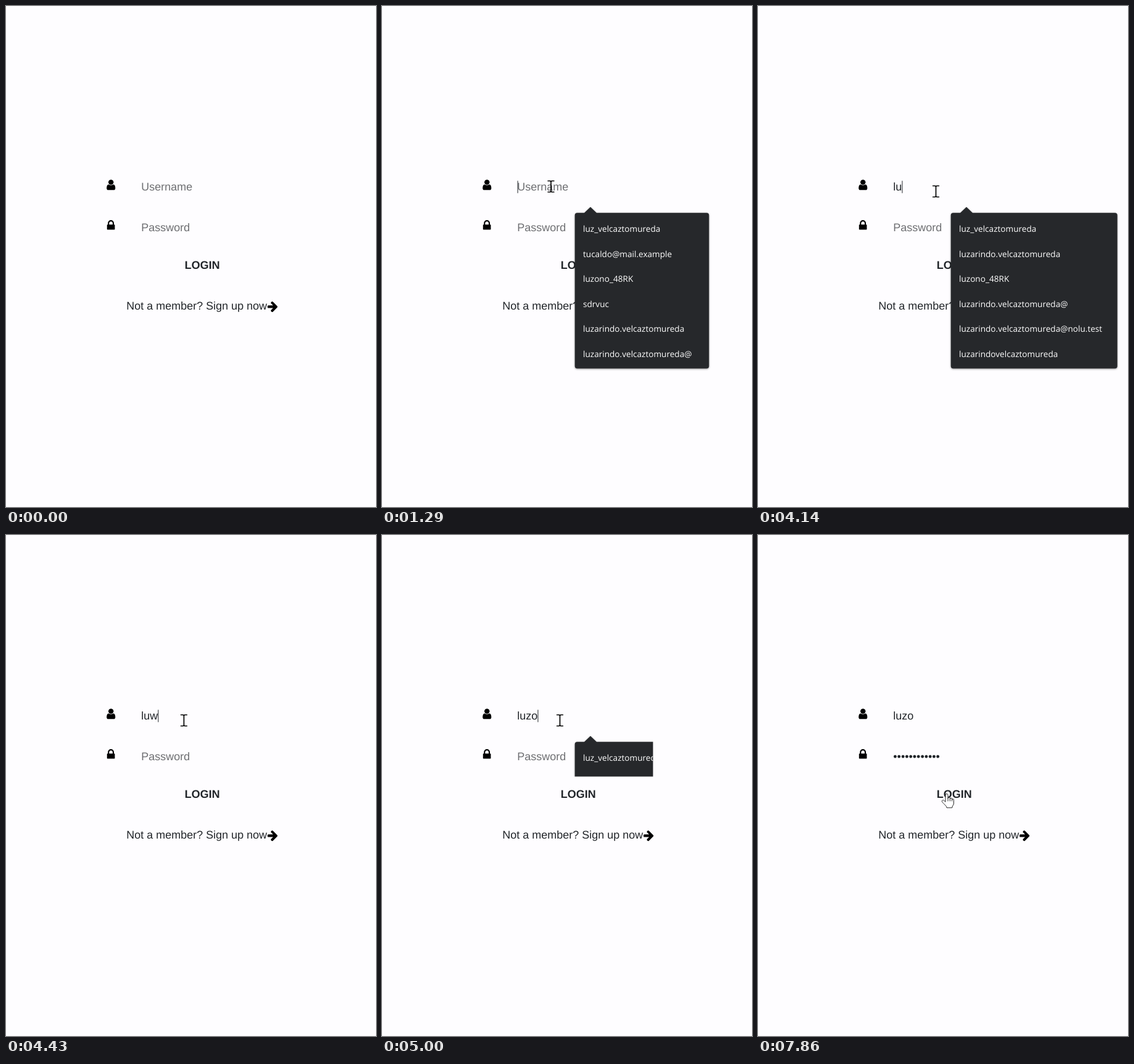
Write an HTML page that moves like this. It is 600 px wide and 812 px high and loops after 8 s.

```html
<!DOCTYPE html>
<html lang="en">
<head>
<meta charset="utf-8">
<title>Login form</title>
<style>
  html, body { margin: 0; width: 100%; height: 100%; overflow: hidden; background: #fefdff; }
  svg { display: block; width: 600px; height: 812px; }
  text { font: 18px "Liberation Sans", Arial, sans-serif; fill: #212529; text-rendering: geometricPrecision; }
  .hint { fill: #6e6f72; }
  .login { font-weight: bold; }
  #menu text { font: 13.6px "Open Sans", "Noto Sans", sans-serif; fill: #fff; }
  #panel { fill: #26282b; filter: drop-shadow(0 1.5px 1.5px rgba(0, 0, 0, .4)); }
</style>
</head>
<body>
<svg viewBox="0 0 600 812">
  <defs>
    <clipPath id="cut"><rect x="300" y="320" width="139.5" height="71.5"/></clipPath>
  </defs>

  <g transform="translate(163.2 296.9) scale(.011 -.011)">
    <path d="M1280 137q0-109-62.5-187t-150.5-78h-854q-88 0-150.5 78t-62.5 187q0 85 8.5 160.5t31.5 152t58.5 131t94 89t134.5 34.5q131-128 313-128t313 128q76 0 134.5-34.5t94-89t58.5-131t31.5-152t8.5-160.5z"/>
    <circle cx="640" cy="1024" r="384"/>
  </g>
  <path transform="translate(163.8 362.6) scale(.011 -.011)" d="M320 768h512v192q0 106-75 181t-181 75t-181-75t-75-181v-192zM1152 672v-576q0-40-28-68t-68-28h-960q-40 0-68 28t-28 68v576q0 40 28 68t68 28h32v192q0 184 132 316t316 132t316-132t132-316v-192h32q40 0 68-28t28-68z"/>
  <path transform="translate(424.1 493.8) scale(.011 -.011)" d="M1472 576q0-54-37-91l-651-651q-39-37-91-37q-51 0-90 37l-75 75q-38 38-38 91t38 91l293 293h-704q-52 0-84.5 37.5t-32.5 90.5v128q0 53 32.5 90.5t84.5 37.5h704l-293 294q-38 36-38 90t38 90l75 75q38 38 90 38q53 0 91-38l651-651q37-35 37-90z"/>

  <text id="user" x="219.3" y="299.2"></text>
  <text id="pass" x="219.3" y="364.6"></text>
  <text class="login" x="289.8" y="426.2">LOGIN</text>
  <text x="195.2" y="492.2">Not a member? Sign up now</text>
  <rect id="caret" width="1" height="20" fill="#212529"/>

  <g id="menu">
    <path id="panel"/>
    <g id="items"></g>
  </g>

  <path id="beam" d="M-5.5-9h4.3l1.2 1l1.2-1h4.3M0-8.5V8.5M-5.5 9h4.3l1.2-1l1.2 1h4.3" fill="none" stroke="#000" stroke-width="1.7"/>
  <g id="hand" fill="#fff" stroke="#222" stroke-width="1" stroke-linejoin="round">
    <path d="M-2 13V2a2 2 0 0 1 4 0V7.5a1.7 1.7 0 0 1 3.4 0V8.5a1.6 1.6 0 0 1 3.2 0V9.7a1.4 1.4 0 0 1 2.8 0V15.5C11.4 18.5 8.8 19 8.8 22.5H0C0 19.5-6.5 15-7.5 12.8S-6 9.6-4.5 10.6z"/>
    <path d="M2 7V12M5.4 8V12M8.6 9V12" fill="none"/>
  </g>
</svg>
<script>
const LOOP = 8000, TICKS = 56;
const $ = id => document.getElementById(id);
const show = (el, on) => el.setAttribute('visibility', on ? 'visible' : 'hidden');
const put = (el, x, y) => el.setAttribute('transform', `translate(${x} ${y})`);

const first = 'luzarindo', last = 'velcaztomureda';
const full = `${first}.${last}`, short = 'luz_' + last, nick = 'luzono_48RK';
const lists = {
  recent: { right: 530.3, names: [short, 'tucaldo@mail.example', nick, 'sdrvuc', full, full + '@'] },
  match: { right: 582.7, names: [short, full, nick, full + '@', full + '@nolu.test', first + last] },
  single: { right: 435, names: [nick] }
};

// Each track holds [tick, value] pairs; a value stays until the next one.
const typed = [[0, ''], [28, 'l'], [29, 'lu'], [31, 'luw'], [33, 'lu'], [34, 'luz'], [35, 'luzo']];
const menus = [[0, ''], [9, 'recent'], [28, 'match'], [31, ''], [33, 'match'], [36, 'single'], [43, '']];
const blink = [[0, 0], [9, 1], [13, 0], [16, 1], [20, 0], [24, 1], [39, 0], [43, 1], [53, 0]];
const at = (track, n) => track.filter(k => k[0] <= n).pop()[1];

// Pointer glides: first tick, last tick, end point.
const glides = [[4, 7, 274, 292.5], [17, 21, 288.5, 300.5], [38, 42, 253.5, 371.5], [52, 55, 306, 419.5]];

function pointer(n) {
  let x = 262, y = 352;
  for (const [a, b, tx, ty] of glides) {
    const p = Math.min(1, Math.max(0, (n - a) / (b - a)));
    const e = p * p * (3 - 2 * p);
    x += (tx - x) * e;
    y += (ty - y) * e;
  }
  return [x, y];
}

function field(el, value, hint) {
  el.textContent = value || hint;
  el.setAttribute('class', value ? '' : 'hint');
  return value ? 219.4 + el.getComputedTextLength() : 219.6;
}

function drawMenu(key, cut) {
  const menu = $('menu'), list = lists[key];
  menu.style.display = list ? '' : 'none';
  if (!list) return;
  const { right, names } = list;
  const bottom = names.length > 1 ? 587.5 : 387;
  $('panel').setAttribute('d', `M316.7 335.2H328L338 325.8L348 335.2H${right - 4}q4 0 4 4V${bottom - 4}q0 4-4 4H316.7q-4 0-4-4V339.2q0-4 4-4z`);
  $('items').innerHTML = names.map((s, i) => `<text x="326" y="${366 + i * 40.5}">${s}</text>`).join('');
  if (cut) menu.setAttribute('clip-path', 'url(#cut)');
  else menu.removeAttribute('clip-path');
}

function draw(n) {
  const dots = Math.round(12 * Math.min(1, Math.max(0, (n - 44) / 5)));
  const userEnd = field($('user'), at(typed, n), 'Username');
  const passEnd = field($('pass'), '•'.repeat(dots), 'Password');
  const inPass = n >= 43;
  put($('caret'), inPass ? passEnd : userEnd, inPass ? 348.5 : 283.3);
  show($('caret'), at(blink, n));
  drawMenu(at(menus, n), n === 35);

  const [x, y] = pointer(n), onButton = y > 400;
  put($('beam'), x, y);
  put($('hand'), x, y);
  show($('beam'), n >= 5 && !onButton);
  show($('hand'), onButton);
}

let shown = -1;
function frame(now) {
  // The screen refreshes seven times a second.
  const n = Math.floor((now % LOOP + 5) * TICKS / LOOP) % TICKS;
  if (n !== shown) draw(shown = n);
  requestAnimationFrame(frame);
}
draw(0);
requestAnimationFrame(frame);
</script>
</body>
</html>
```
